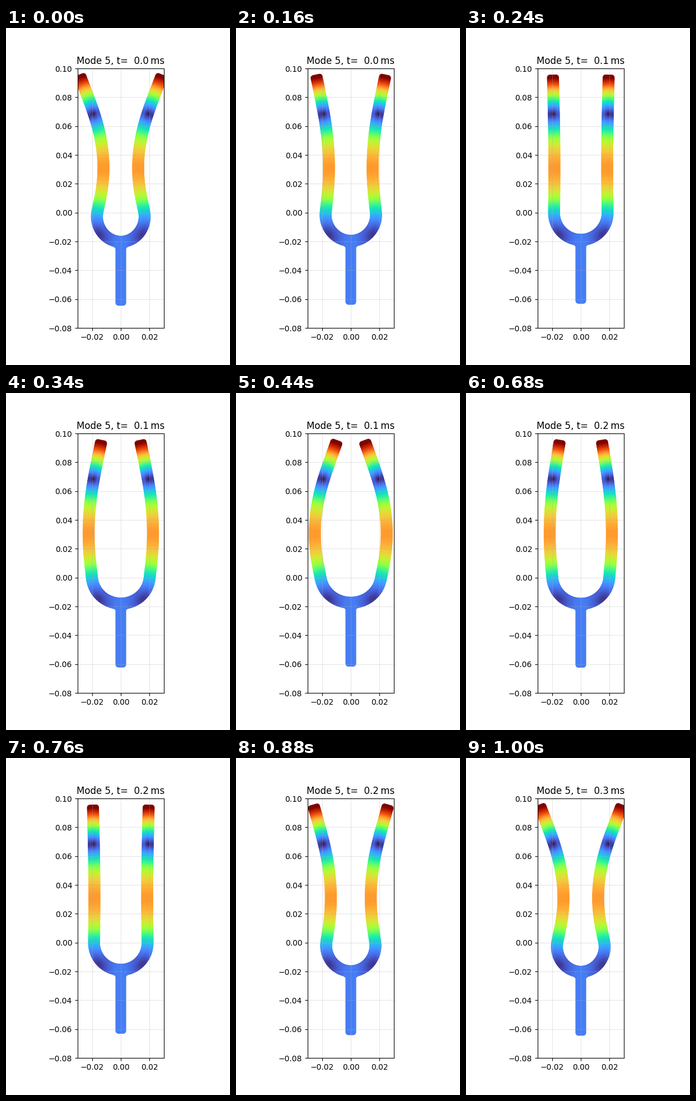
A matplotlib script for the animation above (1020 ms loop, 400 px wide and 600 px high).

```python
import numpy as np
import matplotlib.pyplot as plt
from matplotlib.animation import FuncAnimation

FRAMES = 51
PERIOD = 0.28             # ms, one vibration
PX = 0.18 / 462           # metres per pixel

# Fork geometry in pixels, measured along the core of the body
R = 48.2                  # bend radius of the centre line
ARC = R * np.pi / 2
PRONG = 240.5             # straight part of each prong
HALF = 5.5                # half thickness of the core
STEM_HALF, STEM_END = 4.3, 156.8
DOT = 5.2                 # radius of the dots that fill the body

# Mode shape: outward displacement at points along the centre line
KNOTS = np.array([0, 20, 38, 57, ARC, ARC + 25, ARC + 49, ARC + 84,
                  ARC + 118, ARC + 150, ARC + 176, ARC + 210, ARC + PRONG])
BEND = np.array([3.75, 2.6, 0.1, -3.1, -6.3, -11.5, -15.4, -17.2,
                 -14.3, -7.8, -0.1, 12.2, 24.0])


def spline(x, y, q):
    """Natural cubic spline through (x, y), evaluated at q."""
    n, h = len(x), np.diff(x)
    a, b = np.eye(n), np.zeros(n)
    for i in range(1, n - 1):
        a[i, i - 1:i + 2] = h[i - 1], 2 * (h[i - 1] + h[i]), h[i]
        b[i] = 6 * ((y[i + 1] - y[i]) / h[i] - (y[i] - y[i - 1]) / h[i - 1])
    m = np.linalg.solve(a, b)
    k = np.clip(np.searchsorted(x, q) - 1, 0, n - 2)
    l, r, d = x[k + 1] - q, q - x[k], h[k]
    return ((m[k] * l**3 + m[k + 1] * r**3) / (6 * d)
            + (y[k] / d - m[k] * d / 6) * l
            + (y[k + 1] / d - m[k + 1] * d / 6) * r)


def prong():
    """Rest points and displacements of the right half of the U."""
    s = np.linspace(0, ARC + PRONG, 164)
    x = np.concatenate([-KNOTS[:0:-1], KNOTS])
    y = np.concatenate([BEND[:0:-1], BEND])
    w = spline(x, y, s)
    slope = np.gradient(w, s)
    curv = np.where(s < ARC, 1 / R, 0)
    # the centre line keeps its length
    f = w * curv
    v = -np.concatenate([[0], np.cumsum((f[1:] + f[:-1]) / 2 * np.diff(s))])
    phi = np.minimum(s / R, np.pi / 2)
    sin, cos = np.sin(phi), np.cos(phi)
    rise = np.maximum(s - ARC, 0)
    pos, disp = [], []
    for z in np.linspace(-HALF, HALF, 5):
        along = v + z * (curv * v - slope)
        pos.append(np.column_stack([(R + z) * sin, rise - (R + z) * cos]))
        disp.append(np.column_stack([along * cos + w * sin,
                                     along * sin - w * cos]))
    return np.vstack(pos), np.vstack(disp)


def stem():
    """Stem with a small fillet; it moves as a rigid body."""
    y = np.linspace(R, STEM_END, 56)
    t = np.clip((y - R - HALF) / 6, 0, 1)
    half = STEM_HALF + 5 * (1 - t)**2
    pos = np.vstack([np.column_stack([k * half, -y])
                     for k in np.linspace(-1, 1, 5)])
    return pos, np.tile([0, -BEND[0]], (len(pos), 1))


flip = np.array([-1, 1])
p, d = prong()
sp, sd = stem()
rest = np.vstack([p, p * flip, sp]) * PX
move = np.vstack([d, d * flip, sd]) * PX
size = np.hypot(*move.T)

# Smaller dots on top keep the colour gradient crisp
radii = np.repeat([DOT, 3.6, 2.0], len(rest))
rest, move, size = np.tile(rest, (3, 1)), np.tile(move, (3, 1)), np.tile(size, 3)

fig, ax = plt.subplots(figsize=(4, 6), dpi=100)
dots = ax.scatter(*rest.T, c=size, s=(1.44 * radii)**2, linewidths=0,
                  cmap="turbo", vmin=0, vmax=size.max())
ax.set_aspect("equal")
ax.set_xlim(-0.03, 0.03)
ax.set_ylim(-0.08, 0.10)
ax.set_xticks([-0.02, 0, 0.02])
ax.set_yticks(np.arange(-4, 6) * 0.02)
ax.grid(alpha=0.3)
title = ax.set_title("")


def update(i):
    turn = i / (FRAMES - 1)
    dots.set_offsets(rest + move * np.cos(2 * np.pi * turn))
    title.set_text(f"Mode 5, t={PERIOD * turn:5.1f}\u2009ms")
    return dots, title


anim = FuncAnimation(fig, update, frames=FRAMES, interval=20,
                     repeat=True, repeat_delay=0)
plt.show()
```
